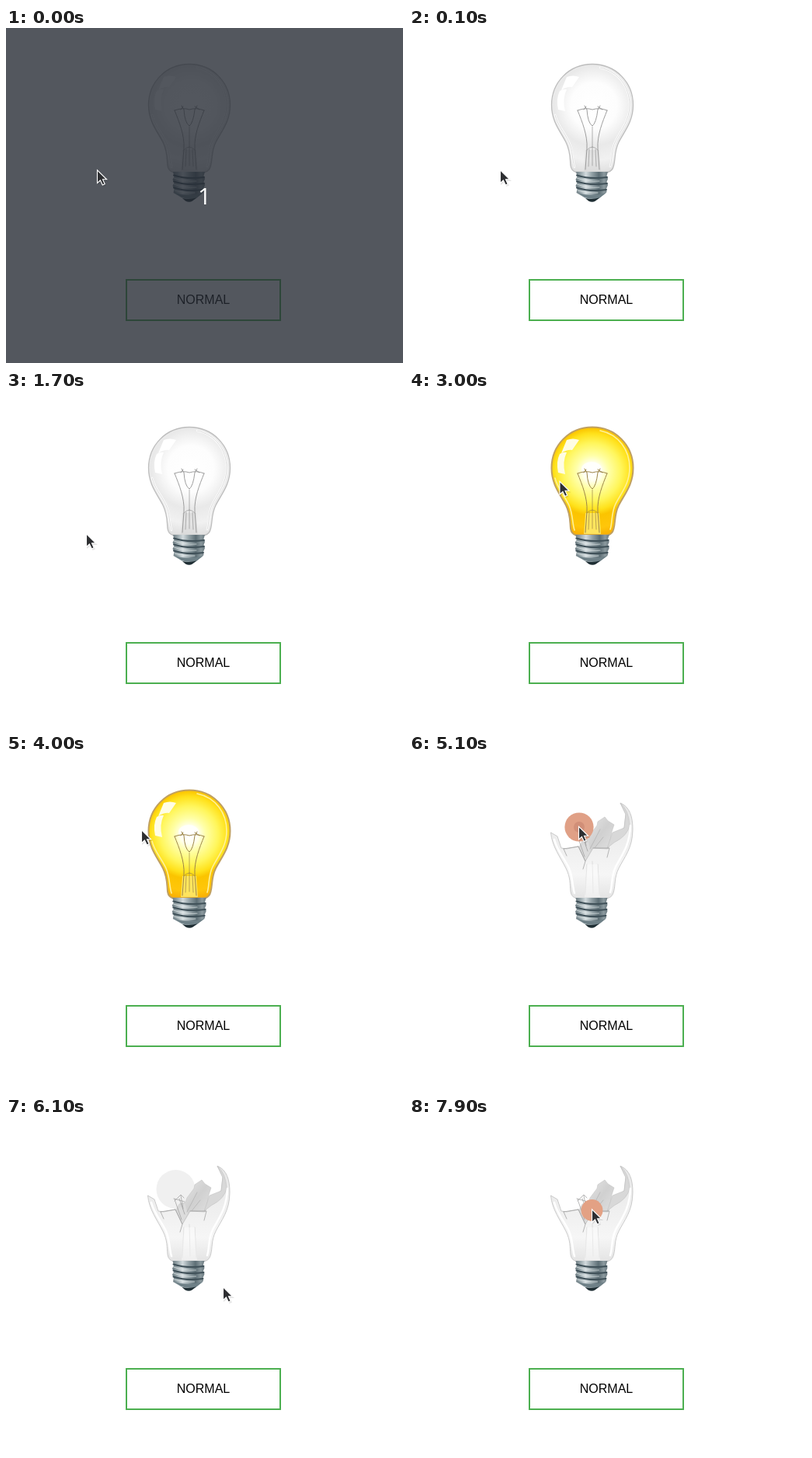
An HTML page that plays this animation: 511x431 px, repeating every 8000 ms.

```html
<!DOCTYPE html>
<html lang="en">
<head>
<meta charset="utf-8">
<title>Light bulb</title>
<style>
html, body { margin: 0; width: 100%; height: 100%; overflow: hidden; background: #fff; }
svg { position: absolute; left: 0; top: 0; width: 511px; height: 431px; }
.button {
  position: absolute; left: 154px; top: 323px; width: 200px; height: 54px; box-sizing: border-box;
  border: 2px solid #4caf50; color: #000; text-align: center;
  font: 16px/50px "Liberation Sans", Arial, sans-serif;
}
.line { fill: none; stroke-linecap: round; stroke-linejoin: round; }
</style>
</head>
<body>
<div class="button">NORMAL</div>
<svg viewBox="0 0 511 431">
  <defs>
    <radialGradient id="clear" gradientUnits="userSpaceOnUse" cx="238" cy="100" r="88">
      <stop offset="0" stop-color="#fff"/><stop offset=".34" stop-color="#fdfdfd"/>
      <stop offset=".58" stop-color="#e9e9e9"/><stop offset=".8" stop-color="#f1f1f1"/>
      <stop offset="1" stop-color="#dedede"/>
    </radialGradient>
    <radialGradient id="glow" gradientUnits="userSpaceOnUse" cx="236" cy="104" r="88">
      <stop offset="0" stop-color="#fff"/><stop offset=".13" stop-color="#fffff0"/>
      <stop offset=".24" stop-color="#ffffa8"/><stop offset=".42" stop-color="#fff65c"/>
      <stop offset=".56" stop-color="#ffe11a"/><stop offset=".64" stop-color="#fbc400"/>
      <stop offset=".82" stop-color="#ffc60a"/><stop offset="1" stop-color="#f5a300"/>
    </radialGradient>
    <linearGradient id="metal">
      <stop offset="0" stop-color="#6b7a80"/><stop offset=".14" stop-color="#93a1a6"/>
      <stop offset=".32" stop-color="#d3dbde"/><stop offset=".5" stop-color="#95a3a8"/>
      <stop offset=".72" stop-color="#5d6e75"/><stop offset=".88" stop-color="#8b999e"/>
      <stop offset="1" stop-color="#6b7a80"/>
    </linearGradient>
    <linearGradient id="shard" x1="0" x2="1" y1="0" y2="1">
      <stop offset="0" stop-color="#ececec"/><stop offset=".5" stop-color="#d0d0d0"/><stop offset="1" stop-color="#e6e6e6"/>
    </linearGradient>
    <linearGradient id="front" x2="0" y2="1">
      <stop offset="0" stop-color="#e6e6e6"/><stop offset=".5" stop-color="#f0f0f0"/>
      <stop offset=".75" stop-color="#f6f6f6"/><stop offset="1" stop-color="#e4e4e4"/>
    </linearGradient>

    <path id="glass" d="M236 46.5C266 46.5 288.500 70 288.500 99C288.500 121 277 133 270 147C264 159 266 168 263.500 177Q262 184 256 185.500H215Q209 184 208 177C207 167 208 159 202 147C195 133 183.500 121 183.500 99C183.500 70 206 46.500 236 46.500Z"/>
    <path id="inner" class="line" d="M246 51C270 56 284 76 284 99C284 119 273 131 266 145C260 157 262 170 259 178M188 112C191 125 200 134 206 147C211 158 210 170 213 179"/>
    <g id="shine">
      <path d="M203 63Q211 60 219 63L210 76Q204 75 196 80Z"/>
      <path d="M194 81Q199 78 203 79Q197 91 201 107L192 105Q189 91 194 81Z"/>
    </g>
    <g id="filament" class="line">
      <path d="M217 106Q228 102 236 105Q245 102 255 106M217 106C223 121 230 138 229 155L227 182M255 106C249 121 242 138 243 155L245 182"/>
      <path d="M226 100L229 105Q230 122 236 126Q241 122 243 105L246 100M225 105L228 101M243 101L249 105"/>
      <path d="M236 127V153M229 157Q236 149 243 157M232 156L231 178M236 153V177M240 156L241 178" stroke-width=".7"/>
    </g>
    <g id="base">
      <path d="M215 185H256L254.500 190L256 194L254.500 198L256 202L254 207L254.500 211L245 219Q236 226 227 219L215.500 212L216.500 207L214.500 203L216.500 199L214.500 195L216.500 191Z" fill="url(#metal)"/>
      <g class="line" stroke="#3f5058" stroke-width="2">
        <path d="M216 189.500Q233 195 255 192M216 197.500Q233 203 255 200M216 205.500Q233 211 254 208"/>
      </g>
      <g class="line" stroke="#e9eff0" stroke-width="1" opacity=".7">
        <path d="M216 193Q229 198 245 197M216 201Q229 206 245 205M217 209Q229 213 243 212"/>
      </g>
      <path d="M217 212Q235 218 254 212L246 218Q236 221 226 218Z" fill="#6e8087"/>
      <path d="M227 219Q236 221 245 218.500L240 222.500Q236 225 231 222.500Z" fill="#1f2e34"/>
    </g>
  </defs>

  <g id="off">
    <use href="#glass" fill="url(#clear)" stroke="#bdbdbd" stroke-width="1.300"/>
    <use href="#inner" stroke="#fff" stroke-width="2.500"/>
    <use href="#inner" stroke="#cdcdcd" stroke-width=".7"/>
    <path d="M227 157L245 157L247 184H225Z" fill="#d2d2d2" opacity=".45"/>
    <use href="#shine" fill="#fff"/>
    <use href="#filament" stroke="#949494" stroke-width=".9"/>
    <use href="#base"/>
  </g>

  <g id="on">
    <use href="#glass" fill="url(#glow)" stroke="#c0a060" stroke-width="2"/>
    <use href="#inner" stroke="#fff29a" stroke-width="1.600"/>
    <path d="M227 157L245 157L247 184H225Z" fill="#ffed74" opacity=".8"/>
    <use href="#shine" fill="#fffde4"/>
    <ellipse cx="235" cy="100" rx="13" ry="9" fill="#fff" opacity=".75"/>
    <use href="#filament" stroke="#9b8447"/>
    <use href="#base" transform="translate(236 0) scale(1.060 1) translate(-235.500 0)"/>
  </g>

  <g id="broken">
    <circle id="residue" cx="218.500" cy="93" r="25" fill="#f0f0f0"/>
    <path d="M219 120L223 112L231 110L233 104L242 92L243 87L252 81L256 86L264 91L261 100L257 122L240 123L227 138Z" fill="url(#shard)" stroke="#c4c4c4" stroke-width=".6"/>
    <path d="M220 120L230 111L234 124L227 137Z" fill="#dcdcdc"/>
    <path d="M246 97L233 122M250 107L238 122" class="line" stroke="#b0b0b0" stroke-width=".7"/>
    <path d="M182.500 101L191 106L196 121L203 122L218 119L227 138L237 121L256 122L263 105L277 95L279 77L272 63C284 68 288 80 288 97C288 121 277 133 270 147C264 159 266 168 263.500 177Q262 184 256 185.500H215Q209 184 208 177C207 167 208 159 202 147C195 133 184 119 182.500 101Z" fill="url(#front)" stroke="#c6c6c6" stroke-width=".9"/>
    <path d="M272 63L279 78L277 95L262 101L255 121L264 114Q282 105 284 91Q283 73 272 63Z" fill="#d8d8d8" stroke="#bcbcbc" stroke-width=".5"/>
    <path d="M285 92C284 119 273 131 266 145C260 157 262 170 259 178M187 110C191 125 200 134 206 147C211 158 210 170 213 179" class="line" stroke="#fff" stroke-width="2.500"/>
    <g class="line" stroke="#9a9a9a" stroke-width=".7">
      <path d="M216 105L230 109M217 108L225 100L229 104M217 106L226 132M223 105L230 125M225 101L228 118M199 122L203 131M218 119L227 138L224 148M199 122L218 119M237 121L258 121L255 133"/>
      <path d="M229 142L227 181M236 138L237 179M243 142L245 181" stroke="#d2d2d2"/>
    </g>
    <path d="M229 142H243L246 184H226Z" fill="#fff" opacity=".4"/>
    <use href="#base" x="-.5"/>
  </g>

  <g id="countdown">
    <rect width="511" height="431" fill="#262a33" fill-opacity=".79"/>
    <text x="255.500" y="227" text-anchor="middle" fill="#fff" font-family="'Open Sans', 'Noto Sans', sans-serif" font-size="30">1</text>
  </g>

  <g id="ripples"></g>

  <g id="cursor">
    <path d="M1 2V20L5.500 16.500L8.500 22L12 20.500L9.500 15H15Z" fill="#000" opacity=".1"/>
    <path d="M.5 .8V17.500L4.400 14L7.300 20L10.200 18.700L7.500 12.800H12.600Z" fill="#2d2e31" stroke="#fff" stroke-width="1.100"/>
  </g>
</svg>

<script>
const LOOP = 8000, STEP = 100, BREAK_AT = 5100, HOVER_X = 172;
const get = id => document.getElementById(id);
const show = (id, visible) => { get(id).style.display = visible ? "" : "none"; };

// Pointer tip: time, x, y
const track = [
  [0, 117, 182], [200, 117, 182], [300, 126, 177], [500, 196, 143], [600, 209, 136],
  [700, 209, 136], [800, 196, 142], [1000, 113, 180], [1100, 97, 186],
  [1600, 97, 186], [1700, 103, 183], [2000, 139, 161], [2500, 197, 121], [2600, 207, 112],
  [2900, 207, 112], [3100, 180, 119], [3400, 80, 128], [3500, 73, 127], [3800, 111, 110],
  [4000, 174, 97], [4200, 214, 93], [4300, 218, 92.5],
  [5600, 218, 92.5], [5800, 248, 146], [6000, 283, 222], [6100, 279, 218],
  [6300, 218, 170], [6500, 179, 136], [6800, 179, 136], [7000, 222, 122], [7100, 235, 118]
];
const clicks = [
  { time: 4800, x: 219, y: 94, color: "#e0a086" },
  { time: 5050, x: 219, y: 94, color: "#d18f78" },
  { time: 7700, x: 235.5, y: 120, color: "#e3a184" }
];

for (const click of clicks) {
  click.node = document.createElementNS("http://www.w3.org/2000/svg", "circle");
  click.node.setAttribute("cx", click.x);
  click.node.setAttribute("cy", click.y);
  click.node.setAttribute("fill", click.color);
  get("ripples").append(click.node);
}

function pointerAt(time) {
  const next = track.findIndex(point => point[0] > time);
  if (next < 0) return track[track.length - 1].slice(1);
  const [t0, x0, y0] = track[next - 1], [t1, x1, y1] = track[next];
  const k = (time - t0) / (t1 - t0);
  return [x0 + (x1 - x0) * k, y0 + (y1 - y0) * k];
}

function drawRipple({ node, time: start }, time) {
  const age = time - start;
  const opacity = age < 0 ? 0 : Math.max(0, Math.min(1, 1 - (age - 300) / 300));
  node.setAttribute("r", Math.max(0, Math.min(25, 4.65 * (age / STEP + 1))));
  node.setAttribute("opacity", opacity);
}

function render(elapsed) {
  const time = Math.floor((elapsed % LOOP) / STEP) * STEP;
  const [x, y] = pointerAt(time);
  const broken = time >= BREAK_AT, lit = !broken && x >= HOVER_X;
  show("off", !broken && !lit);
  show("on", lit);
  show("broken", broken);
  show("residue", time >= 5500 && time < 6300);
  show("countdown", time < 100);
  clicks.forEach(click => drawRipple(click, time));
  get("cursor").setAttribute("transform", `translate(${x} ${y})`);
}

const start = performance.now();
function tick() {
  render(performance.now() - start);
  requestAnimationFrame(tick);
}
tick();
</script>
</body>
</html>
```
